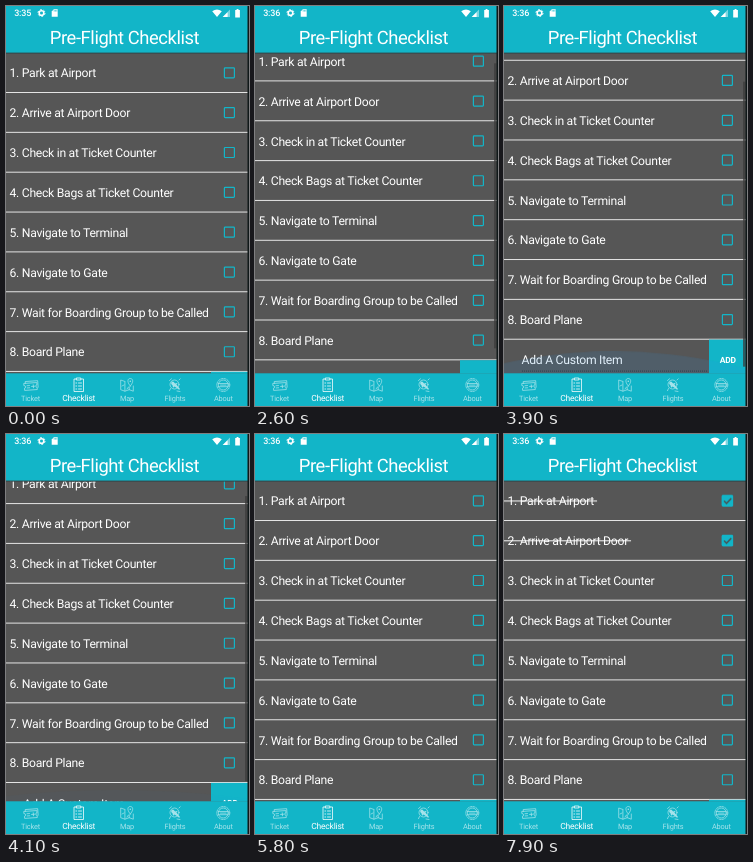
Animation, 243 px wide and 400 px high, one loop 8 s. Source, as an HTML page:

```html
<!DOCTYPE html>
<html lang="en">
<head>
<meta charset="utf-8">
<title>Pre-Flight Checklist</title>
<style>
@property --scroll { syntax: "<length>"; inherits: true; initial-value: 0px; }
:root { --teal: #12b5c8; --cycle: 8s infinite; }
html, body { margin: 0; width: 100%; height: 100%; overflow: hidden; background: #565656; }
svg { display: block; width: 100%; height: 100%; }
text { font-family: Roboto, sans-serif; fill: #fff; letter-spacing: -.023em; text-rendering: geometricPrecision; }
.title { font-size: 18.4px; text-anchor: middle; }
.clock { font-size: 9px; font-weight: 500; }
.item { font-size: 12.2px; }
.add { font-size: 8.5px; font-weight: 700; text-anchor: middle; }
.tab text { font-size: 7.4px; text-anchor: middle; }
.tab { opacity: .62; }
.tab.active { opacity: 1; }
.tab.active text { font-size: 8.5px; }
.line { fill: none; stroke: #fff; stroke-width: .75; stroke-linejoin: round; stroke-linecap: round; }

.list { animation: scroll var(--cycle) linear; }
.rows { transform: translateY(calc(-1 * var(--scroll))); }
.thumb { transform: translateY(calc(.89 * var(--scroll))); animation: thumb var(--cycle) linear; }
.glow { fill: rgb(46 150 230 / .2); opacity: 0; }
.glow.bottom { transform-origin: 0 367px; animation: glow-bottom var(--cycle) linear; }
.glow.top { transform-origin: 0 47px; animation: glow-top var(--cycle) linear; }
.old { animation: old var(--cycle) step-end; }
.new { animation: new var(--cycle) step-end; }
.done0 { animation: done0 var(--cycle) step-end; }
.done1 { animation: done1 var(--cycle) step-end; }

@keyframes scroll {
  0%, 30.5% { --scroll: 0px; }
  32.5% { --scroll: 11.5px; }
  34.5% { --scroll: 27px; }
  36.5%, 46.5% { --scroll: 38px; }
  48.75% { --scroll: 32.3px; }
  51.25% { --scroll: 17px; }
  54.5%, 100% { --scroll: 0px; }
}
@keyframes thumb {
  0%, 30.5% { opacity: 0; }
  31.5%, 56% { opacity: 1; }
  60%, 100% { opacity: 0; }
}
@keyframes glow-bottom {
  0%, 36.5% { opacity: 0; transform: scaleY(.1); }
  40%, 46% { opacity: 1; transform: scaleY(.8); }
  48.75% { opacity: .7; transform: scaleY(.56); }
  52%, 100% { opacity: 0; transform: scaleY(.2); }
}
@keyframes glow-top {
  0%, 54.5% { opacity: 0; transform: scaleY(.1); }
  58%, 60% { opacity: 1; transform: scaleY(.82); }
  66%, 100% { opacity: 0; transform: scaleY(.2); }
}
@keyframes old { 0% { opacity: 1; } 20%, 100% { opacity: 0; } }
@keyframes new { 0% { opacity: 0; } 20%, 100% { opacity: 1; } }
@keyframes done0 { 0% { opacity: 0; } 81.25%, 100% { opacity: 1; } }
@keyframes done1 { 0% { opacity: 0; } 92.5%, 100% { opacity: 1; } }
</style>
</head>
<body>
<svg viewBox="0 0 243 400" preserveAspectRatio="none">
  <defs>
    <clipPath id="view"><rect y="47" width="243" height="320.4"/></clipPath>
  </defs>
  <rect width="243" height="400" fill="#565656"/>

  <g clip-path="url(#view)">
    <g class="list">
      <g class="rows">
        <g id="items"></g>
        <g transform="translate(0 365.8)">
          <text class="item" x="17.6" y="24.7">Add A Custom Item</text>
          <path d="M18 31.5H204" stroke="#2a3338" stroke-dasharray="1 1"/>
          <rect x="205" width="38" height="39" fill="var(--teal)"/>
          <text class="add" x="223.8" y="23.2">ADD</text>
          <path d="M0 39.3H243" stroke="#e4e4e4" stroke-dasharray="1 1"/>
        </g>
      </g>
      <rect class="thumb" x="239" y="47" width="2.5" height="285" fill="#3c3c3c" fill-opacity=".75"/>
    </g>
    <circle class="glow bottom" cx="110" cy="620" r="292"/>
    <circle class="glow top" cx="110" cy="-206" r="292"/>
  </g>

  <rect width="243" height="47" fill="var(--teal)"/>
  <rect y="46.6" width="243" height="1" fill="#2f4649"/>
  <text class="title" x="118.5" y="37.6">Pre-Flight Checklist</text>

  <g class="clock">
    <text class="old" x="8.2" y="10.2">3:35</text>
    <text class="new" x="8.2" y="10.2">3:36</text>
  </g>
  <circle cx="35.5" cy="7" r="2.3" fill="none" stroke="#fff" stroke-width="1.6"/>
  <circle cx="35.5" cy="7" r="3.5" fill="none" stroke="#fff" stroke-width="1" stroke-dasharray="1.83"/>
  <path d="M47.8 3.2h3.9v7.6h-6V5.4z" fill="#fff"/>
  <path d="M48.2 4v1.6M49.5 4v1.6M50.8 4v1.6" stroke="var(--teal)" stroke-width=".6"/>
  <path d="M206.2 5.2q4.8-3.6 9.600 0L211 11zM216.800 11h4.800V6.200zM229.200 4h1.400V3h1.900v1h1.400v7.400h-4.700z" fill="#fff"/>
  <path d="M224 3.500V11h-7.500z" fill="#fff" fill-opacity=".45"/>

  <rect y="367.3" width="243" height="32.7" fill="var(--teal)"/>
  <g class="tab">
    <g class="line" transform="rotate(-4 24.5 379.500)">
      <path d="M18.300 377h12.700v2.200a1.300 1.300 0 0 0 0 2.600V384H18.300v-2.200a1.300 1.300 0 0 0 0-2.600z"/>
      <path d="M19.500 377v-1.800h12.500v6.500M21 379.500h2.500M21 381.700h2.500M25.500 380.500h3M27.300 379v3"/>
    </g>
    <text x="24.5" y="394.6">Ticket</text>
  </g>
  <g class="tab active">
    <path class="line" d="M70.300 373h-2.300v12.500h9.500V373h-2.300M70.700 372h4.100v2h-4.100zM69.900 377h.800M72.500 377h3M69.900 380h.800M72.500 380h3M69.900 383h.800M72.500 383h3"/>
    <text x="72.700" y="394.6">Checklist</text>
  </g>
  <g class="tab">
    <path class="line" d="M119 375.500l-4.300-1.500v9.700l4.200 1.500 4.300-1.500 4.100 1.500V380M118.900 376v9M123.200 381v2.700M116 380l2-1M121 383l1.500-2M124.300 380c-3.700-4.200-2.700-7.500 0-7.500s3.700 3.300 0 7.500z"/>
    <circle cx="124.300" cy="375.200" r=".8" fill="#fff"/>
    <text x="121" y="394.6">Map</text>
  </g>
  <g class="tab">
    <circle class="line" cx="168.500" cy="378.500" r="4.500"/>
    <path class="line" d="M163.500 374.500l2-1.700M171 385l3 .5M164.500 382.500l-1 2.200M173 374l1.200-1.200"/>
    <path d="M165.500 375.500l2 .2 1.600 1.700 2.800-.7-1.500 1.700 3.600 4.600-.9.700-4.400-3.200-1.700 1.300-.4-2.400-1.400-1.500z" fill="#fff"/>
    <text x="169" y="394.6">Flights</text>
  </g>
  <g class="tab">
    <circle class="line" cx="217.300" cy="379" r="6.500" stroke-dasharray="2.200 1.200"/>
    <circle class="line" cx="217.300" cy="379" r="5"/>
    <path class="line" d="M212.300 377.500h10M212.300 380.700h10M214.500 379.100h5.600"/>
    <text x="217.300" y="394.6">About</text>
  </g>
  <rect x="241.500" width="1.500" height="400" fill="#101819"/>
</svg>
<script>
const labels = [
  "Park at Airport", "Arrive at Airport Door", "Check in at Ticket Counter",
  "Check Bags at Ticket Counter", "Navigate to Terminal", "Navigate to Gate",
  "Wait for Boarding Group to be Called", "Board Plane"
];
const strikeEnds = [93, 127];
const rowHeight = 39.85;

const doneMark = i => `<g class="done${i}">
  <path d="M0 20.6H${strikeEnds[i]}" stroke="#fff"/>
  <rect x="217.7" y="14.7" width="11.4" height="11.4" rx="1" fill="var(--teal)"/>
  <path d="M220 20.5l2.5 2.5 4.7-5" fill="none" stroke="#4c4c4c" stroke-width="1.4"/>
</g>`;

const row = (label, i) => `<g transform="translate(0 ${46.4 + i * rowHeight})">
  <path d="M0 40.1H243" stroke="#e4e4e4"/>
  <text class="item" x="3.5" y="25">${i + 1}. ${label}</text>
  <rect x="218.4" y="15.4" width="10" height="10" rx=".8" fill="none" stroke="var(--teal)" stroke-width="1.2"/>
  ${i in strikeEnds ? doneMark(i) : ""}
</g>`;

document.getElementById("items").innerHTML = labels.map(row).join("");
</script>
</body>
</html>
```
